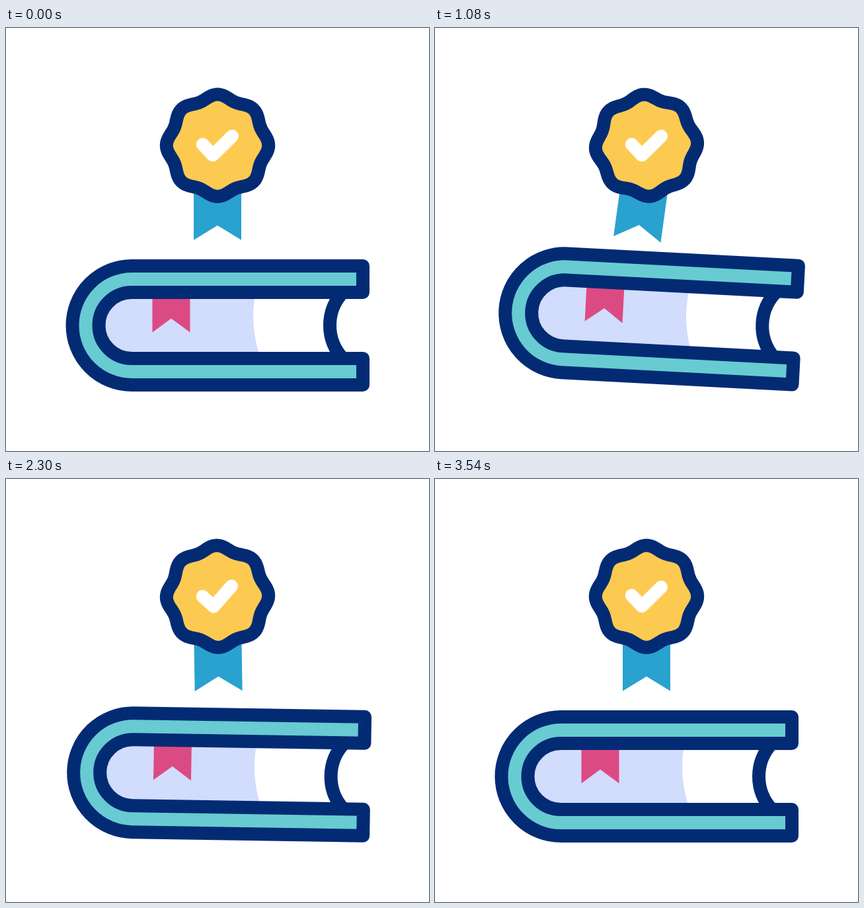
Write an HTML page with a canvas that moves like this. It is 640 px wide and 640 px high and loops after 3600 ms.

```html
<!DOCTYPE html>
<html lang="en">
<head>
<meta charset="utf-8">
<title>Book and badge</title>
<style>
  html, body { margin: 0; width: 100%; height: 100%; overflow: hidden; background: #fff; }
  canvas { display: block; width: 640px; height: 640px; }
</style>
</head>
<body>
<canvas id="stage" width="640" height="640"></canvas>
<script>
const ctx = document.getElementById('stage').getContext('2d');
const LOOP = 3600;
const SPIN_TIME = 1180;
const NAVY = '#032b74', TEAL = '#68cbd1', LAVENDER = '#d2dcfc', PINK = '#dc4a84';
const BLUE = '#29a2cf', YELLOW = '#fdca51', WHITE = '#fff';
const BADGE = { x: 320, y: 177.7 };

// Tracks are lists of [time in ms, value].
const rock = [[0, 0], [480, -4], [820, 0], [1090, 3], [1450, 0], [2020, -2], [2110, 0], [2215, 1], [2560, 0]];
const ribbonSwing = [[0, 0], [400, -12.1], [1160, 8.4], [2080, -3], [2600, 2.5], [3150, 0]];
const badgeWiggle = [[1650, 0], [2040, -7.3], [2620, 7.2], [3120, 0]];
const checkWiggle = [[1650, 0], [2040, -13], [2620, 8.2], [3120, 0]];
const checkScale = [[0, 1], [280, 0], [700, 0], [1050, 1]];

const easeInOut = u => (1 - Math.cos(Math.PI * u)) / 2;
// Fast at rest, slow at the top of each tilt.
const rockEase = (u, from) => from === 0 ? Math.sin(u * Math.PI / 2) : 1 - Math.cos(u * Math.PI / 2);

function sample(track, t, ease = easeInOut) {
  if (t <= track[0][0]) return track[0][1];
  for (let i = 1; i < track.length; i++) {
    const [t0, a] = track[i - 1], [t1, b] = track[i];
    if (t < t1) return a + (b - a) * ease((t - t0) / (t1 - t0), a);
  }
  return track[track.length - 1][1];
}

// Cubic bezier (.5, 0, .5, 1), solved by bisection.
function spinEase(x) {
  let lo = 0, hi = 1;
  for (let i = 0; i < 24; i++) {
    const s = (lo + hi) / 2;
    if (1.5 * s - 1.5 * s * s + s * s * s < x) lo = s; else hi = s;
  }
  return lo * lo * (3 - 2 * lo);
}

function rotated(x, y, degrees, draw) {
  ctx.save();
  ctx.translate(x, y);
  ctx.rotate(degrees * Math.PI / 180);
  ctx.translate(-x, -y);
  draw();
  ctx.restore();
}

function fillShape(color) {
  ctx.fillStyle = color;
  ctx.fill();
}

function strokeShape(color, width) {
  ctx.strokeStyle = color;
  ctx.lineWidth = width;
  ctx.stroke();
}

function swallowtail(left, right, top, bottom, notch, color) {
  ctx.beginPath();
  ctx.moveTo(left, top);
  ctx.lineTo(right, top);
  ctx.lineTo(right, bottom);
  ctx.lineTo((left + right) / 2, notch);
  ctx.lineTo(left, bottom);
  ctx.closePath();
  fillShape(color);
}

function drawBook() {
  const cx = 190.5, cy = 450, quarter = Math.PI / 2;

  ctx.beginPath();
  ctx.moveTo(376.7, 405);
  ctx.lineTo(cx, 405);
  ctx.arc(cx, cy, 45, -quarter, quarter, true);
  ctx.lineTo(383.7, 495);
  ctx.quadraticCurveTo(368.9, 450, 376.7, 405);
  fillShape(LAVENDER);

  swallowtail(221.5, 278.5, 402, 460.5, 439.5, PINK);

  const edge = Math.asin(50 / 73);
  ctx.beginPath();
  ctx.arc(563, cy, 73, Math.PI - edge, Math.PI + edge);
  strokeShape(NAVY, 20);

  ctx.beginPath();
  ctx.moveTo(540, 360);
  ctx.lineTo(cx, 360);
  ctx.arc(cx, cy, 90, -quarter, quarter, true);
  ctx.lineTo(540, 540);
  ctx.lineTo(540, 500);
  ctx.lineTo(cx, 500);
  ctx.arc(cx, cy, 50, quarter, -quarter);
  ctx.lineTo(540, 400);
  ctx.closePath();
  fillShape(TEAL);
  strokeShape(NAVY, 20);
}

function drawBadge() {
  ctx.beginPath();
  for (let deg = 0; deg < 360; deg += 1.5) {
    const a = deg * Math.PI / 180;
    const r = 73.9 + 3.3 * Math.cos(8 * a);
    ctx.lineTo(BADGE.x + r * Math.cos(a), BADGE.y + r * Math.sin(a));
  }
  ctx.closePath();
  fillShape(YELLOW);
  strokeShape(NAVY, 20);
}

function drawCheck(scale) {
  if (scale <= 0) return;
  ctx.translate(BADGE.x, BADGE.y);
  ctx.scale(scale, scale);
  ctx.beginPath();
  ctx.moveTo(-22.5, -1.7);
  ctx.lineTo(-7, 14.8);
  ctx.lineTo(22.3, -14.2);
  strokeShape(WHITE, 19.5);
}

function drawBookTilted(t) {
  const tilt = sample(rock, t, rockEase);
  rotated(tilt < 0 ? 91 : 550, 550, tilt, drawBook);
}

function drawAward(t) {
  const spin = 360 * spinEase(Math.min(t / SPIN_TIME, 1));
  rotated(BADGE.x, 217, sample(ribbonSwing, t),
    () => swallowtail(284, 356, 225, 320.8, 298.8, BLUE));
  rotated(BADGE.x, BADGE.y, spin + sample(badgeWiggle, t), drawBadge);
  rotated(BADGE.x, BADGE.y, sample(checkWiggle, t),
    () => drawCheck(sample(checkScale, t)));
}

function render(now) {
  const t = now % LOOP;
  ctx.fillStyle = WHITE;
  ctx.fillRect(0, 0, 640, 640);
  ctx.lineCap = ctx.lineJoin = 'round';
  drawBookTilted(t);
  drawAward(t);
}

const start = performance.now();
function tick() {
  render(performance.now() - start);
  requestAnimationFrame(tick);
}
tick();
</script>
</body>
</html>
```
